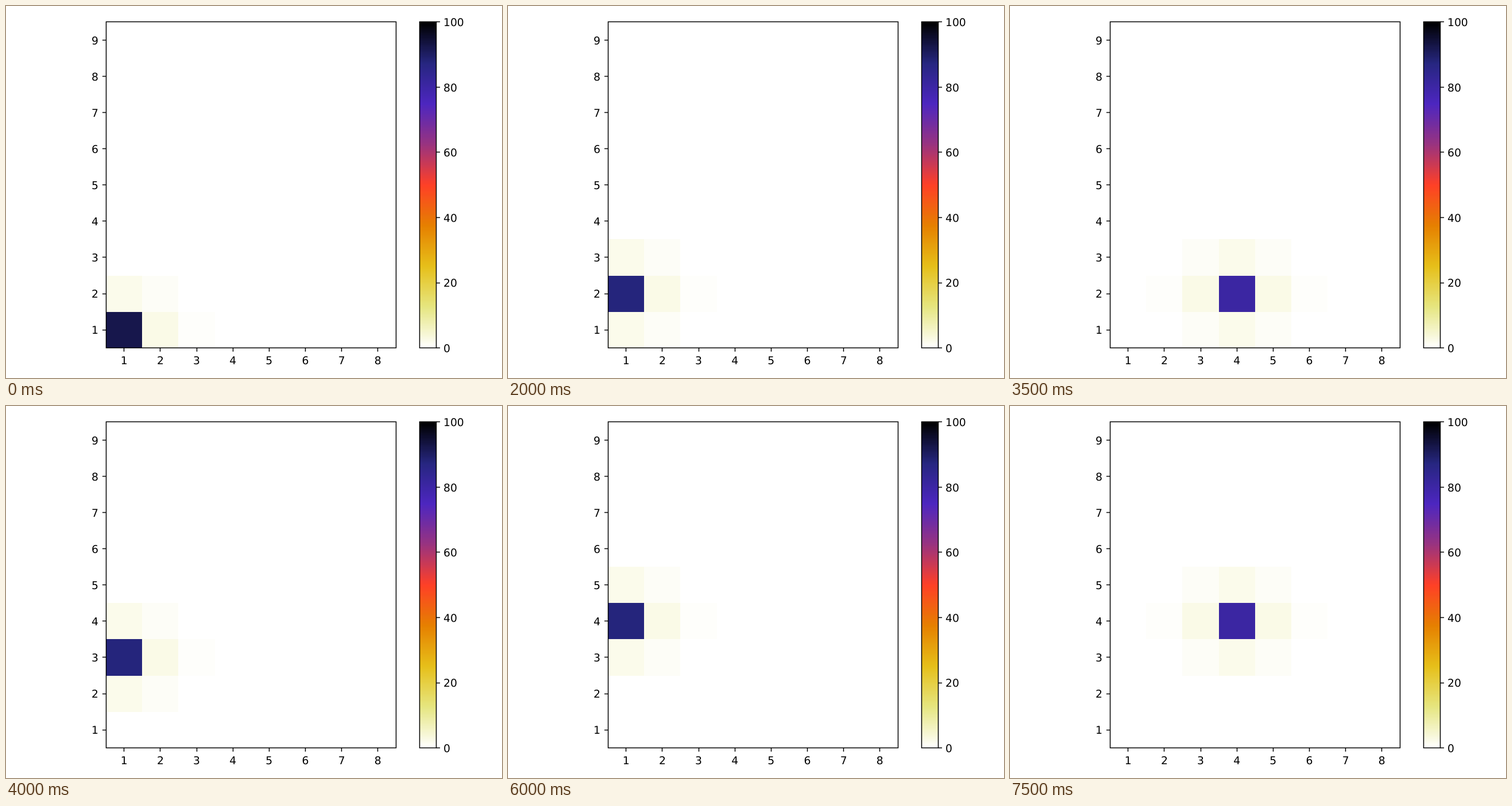
Animation, 864 px wide and 648 px high, one loop 8000 ms. Source, as an HTML page with a canvas:

```html
<!DOCTYPE html>
<html lang="en">
<head>
<meta charset="utf-8">
<title>Grid belief heatmap</title>
<style>
html, body { margin: 0; width: 864px; height: 648px; overflow: hidden; background: #fff; }
canvas, svg { position: absolute; left: 0; top: 0; display: block; }
text { font: 18.75px "DejaVu Sans", sans-serif; fill: #000; text-rendering: geometricPrecision; }
</style>
</head>
<body>
<canvas id="stage" width="864" height="648"></canvas>
<svg id="labels" width="864" height="648"></svg>
<script>
const ctx = document.getElementById("stage").getContext("2d");
const labels = document.getElementById("labels");

const COLS = 8, ROWS = 9, WALK = 4, STEP = 500, TICK = 6.56;
const plot = { left: 174.2, right: 679.3, top: 27.75, bottom: 595.75 };
const bar = { left: 720.9, right: 749.3, top: plot.top, bottom: plot.bottom };
const cellW = (plot.right - plot.left) / COLS;
const cellH = (plot.bottom - plot.top) / ROWS;

// colour stops at equal distances from 0 to 100
const stops = [
  [1, 1, 1], [.9, .9, .5], [.9, .75, .1], [.9, .5, 0], [1, .25, .15],
  [.6, .2, .5], [.3, .15, .75], [.15, .15, .5], [0, 0, 0]
];

function colour(v) {
  const p = Math.min(255, Math.floor(v * 2.56)) / 255 * 8;
  const i = Math.min(7, Math.floor(p)), f = p - i;
  const rgb = stops[i].map((c, k) => Math.round(255 * (c + (stops[i + 1][k] - c) * f)));
  return `rgb(${rgb})`;
}

// lines sit on pixel centres
const snap = n => Math.floor(n) + .5;
const tickX = i => plot.left + (i - .5) * cellW;
const tickY = i => plot.bottom - (i - .5) * cellH;
const barY = v => plot.bottom - v / 100 * (plot.bottom - plot.top);

function cell(col, row, v) {
  if (col < 1 || col > COLS || row < 1 || row > ROWS) return;
  const x0 = Math.round(plot.left + (col - 1) * cellW), x1 = Math.round(plot.left + col * cellW);
  const y0 = Math.round(plot.bottom - row * cellH), y1 = Math.round(plot.bottom - (row - 1) * cellH);
  ctx.fillStyle = colour(v);
  ctx.fillRect(x0, y0, x1 - x0, y1 - y0);
}

function line(x0, y0, x1, y1) {
  ctx.beginPath();
  ctx.moveTo(x0, y0);
  ctx.lineTo(x1, y1);
  ctx.stroke();
}

function frame(box) {
  const x = snap(box.left), y = snap(box.top);
  ctx.strokeRect(x, y, snap(box.right) - x, snap(box.bottom) - y);
}

function label(str, x, y, anchor) {
  const el = document.createElementNS("http://www.w3.org/2000/svg", "text");
  el.setAttribute("x", x);
  el.setAttribute("y", y);
  el.setAttribute("text-anchor", anchor);
  el.textContent = str;
  labels.append(el);
}

function addLabels() {
  for (let i = 1; i <= COLS; i++) label(i, tickX(i), 624, "middle");
  for (let i = 1; i <= ROWS; i++) label(i, 161, Math.round(tickY(i) + 7.2), "end");
  for (let v = 0; v <= 100; v += 20) label(v, 762, Math.round(barY(v) + 7.2), "start");
}

function drawAxes() {
  ctx.strokeStyle = "#000";
  ctx.lineWidth = 1.5;
  frame(plot);
  frame(bar);
  const x0 = snap(plot.left), y0 = snap(plot.bottom), x1 = snap(bar.right);
  for (let i = 1; i <= COLS; i++) line(snap(tickX(i)), y0, snap(tickX(i)), y0 + TICK);
  for (let i = 1; i <= ROWS; i++) line(x0 - TICK, snap(tickY(i)), x0, snap(tickY(i)));
  for (let v = 0; v <= 100; v += 20) line(x1, snap(barY(v)), x1 + TICK, snap(barY(v)));
}

function drawBar() {
  const x = snap(bar.left), y0 = Math.round(bar.top), y1 = Math.round(bar.bottom);
  for (let y = y0; y < y1; y++) {
    ctx.fillStyle = colour((y1 - y - .5) / (y1 - y0) * 100);
    ctx.fillRect(x, y, snap(bar.right) - x, 1);
  }
}

// the peak keeps what cannot spill past an edge
const peak = (col, row) => 80.7 + (col === 1 ? 6.8 : 0) + (row === 1 ? 5 : 0);

function drawBelief(col, row) {
  for (const d of [-1, 1]) {
    cell(col + 2 * d, row, .5);
    cell(col + d, row, 2.7);
    cell(col, row + d, 2);
    cell(col + d, row - 1, .9);
    cell(col + d, row + 1, .9);
  }
  cell(col, row, peak(col, row));
}

function draw(n) {
  ctx.fillStyle = "#fff";
  ctx.fillRect(0, 0, 864, 648);
  drawBelief(n % WALK + 1, Math.floor(n / WALK) + 1);
  drawBar();
  drawAxes();
}

let shown = -1;
function tick() {
  const n = Math.floor(performance.now() / STEP) % (WALK * WALK);
  if (n !== shown) draw(shown = n);
  requestAnimationFrame(tick);
}

addLabels();
tick();
</script>
</body>
</html>
```
